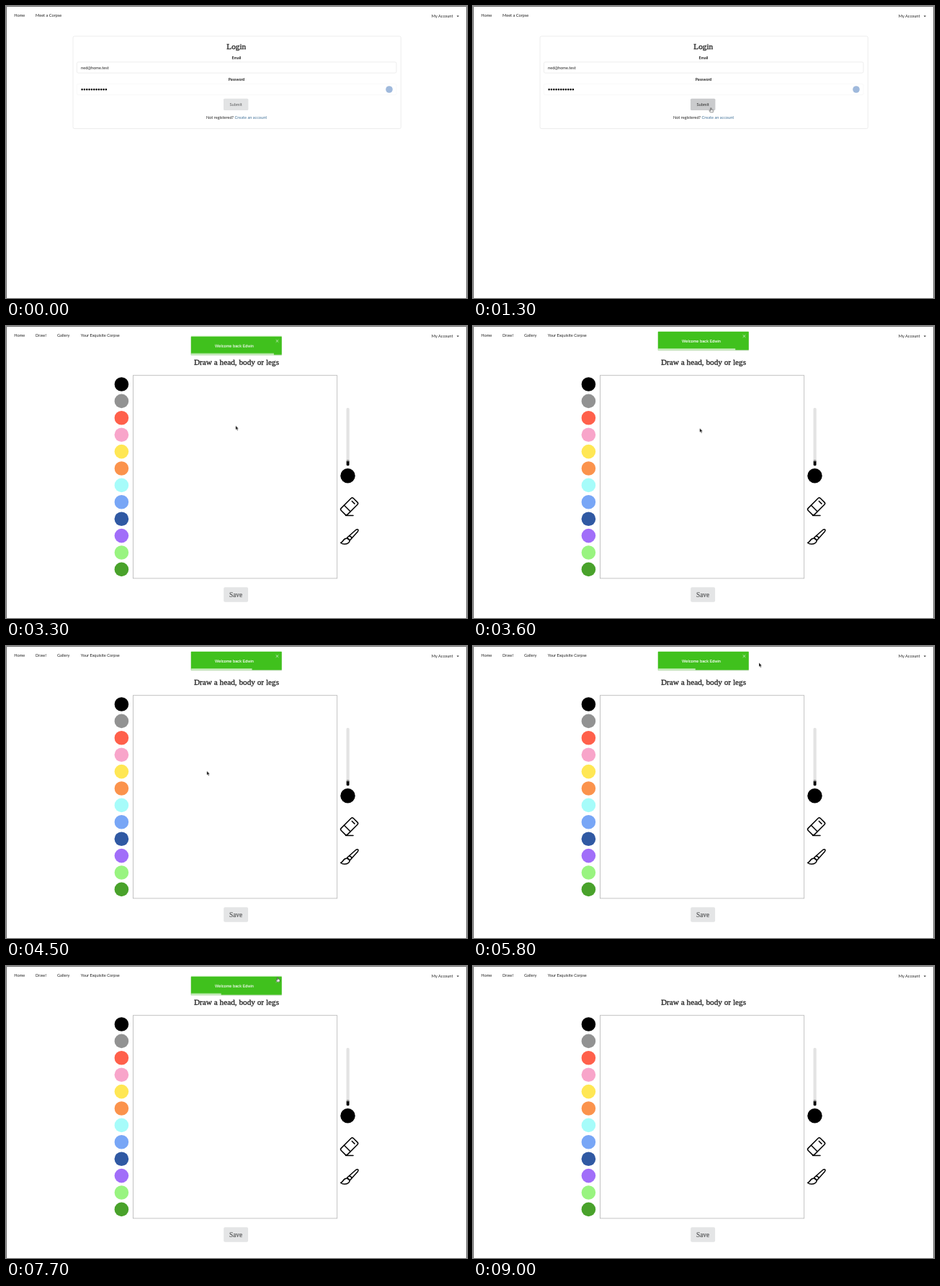
Animation, 640 px wide and 406 px high, one loop 9200 ms. Source, as an HTML page:

```html
<!DOCTYPE html>
<html lang="en">
<head>
<meta charset="utf-8">
<title>Drawing app login</title>
<style>
  html, body { margin: 0; width: 100%; height: 100%; overflow: hidden; background: #fff; }
  svg { display: block; width: 640px; height: 406px; }
  text { font: 5.65px Lato, sans-serif; fill: #222; }
  .mid { text-anchor: middle; }
  .label { font-size: 5.3px; font-weight: 700; }
  .title { font: 11.25px "Liberation Serif", serif; stroke: #222; stroke-width: .3; }
  .save { font: 9.3px "Liberation Serif", serif; fill: #58595a; stroke: #58595a; stroke-width: .2; }
  .toast-text { font: 5.65px "Liberation Sans", sans-serif; fill: #fff; stroke: #fff; stroke-width: .1; }
  .link { fill: #45749b; }
  .line { fill: none; stroke: #000; stroke-width: 1.5; stroke-linejoin: round; stroke-linecap: round; }
  .box { fill: #fff; stroke: #e6e6e6; stroke-width: .7; }
  #bar { transform-box: fill-box; transform-origin: left; }
</style>
</head>
<body>
<svg viewBox="0 0 640 406" xmlns="http://www.w3.org/2000/svg">
  <path d="M.5 406V.5H639.5V406" fill="none" stroke="#6a6a6a"/>
  <text x="11.3" y="15.3">Home</text>
  <text x="590.8" y="16.1">My Account</text>
  <path d="M625.7 13.4h3.2l-1.6 1.8z" fill="#222"/>

  <g id="login">
    <text x="41" y="15.3">Meet a Corpse</text>
    <rect class="box" x="93" y="42" width="455.3" height="128.5" rx="2"/>
    <text class="title mid" x="319.8" y="60">Login</text>
    <text class="label mid" x="320" y="73.9">Email</text>
    <rect class="box" x="98.4" y="77.9" width="443.6" height="15.2" rx="2"/>
    <text x="104" y="87.6">ned@home.test</text>
    <text class="label mid" x="320" y="104.1">Password</text>
    <rect class="box" x="98.4" y="108.3" width="443.6" height="15.2" rx="2" stroke-opacity=".4"/>
    <g id="dots"></g>
    <circle id="badge" cx="532" cy="116" r="4.8" fill="#9fb9dc"/>
    <rect id="submit" x="302" y="128.7" width="34.4" height="16.4" rx="1.6" fill="#e2e3e4"/>
    <text id="submitText" class="mid" x="319.2" y="139">Submit</text>
    <text x="278" y="157">Not registered? <tspan class="link">Create an account</tspan></text>
  </g>

  <g id="draw">
    <text x="41" y="15.3">Draw!</text>
    <text x="71" y="15.3">Gallery</text>
    <text x="103.8" y="15.3">Your Exquisite Corpse</text>
    <text class="title mid" x="320" y="53.8">Draw a head, body or legs</text>
    <rect x="176.5" y="68.7" width="283.2" height="282.2" fill="#fff" stroke="#b4b4b4" stroke-width=".8"/>
    <g id="palette"></g>
    <rect x="472.5" y="113.8" width="4.2" height="80.5" rx="2" fill="#e3e3e3"/>
    <rect x="472.7" y="187" width="3.8" height="7.2" rx="1.5"/>
    <rect x="472.7" y="186" width="3.8" height="2.2" rx="1" fill="#999"/>
    <circle cx="474.5" cy="208.3" r="10.2"/>
    <g class="line">
      <g transform="translate(476.6 250.8) rotate(-45)">
        <rect x="-12" y="-6.2" width="24" height="12.4" rx="2.2"/>
        <path d="M-4 -6.2V6.2M7.8 -2.6V2.6"/>
      </g>
      <path d="M471.5 263.4H482"/>
      <path d="M473.6 294.2L486 283.3q1.8-1.2 2.7-.2t-.3 2.6L477.4 298zM476.8 291.2L480.4 294.6"/>
      <path d="M473.2 295.2c-5-.2-4.4 4.4-8.5 6.3c3 2.3 8.4 2.2 10.8 0c1.7-1.6 1.8-2.9 1.5-4z"/>
    </g>
    <rect x="302.2" y="363.2" width="33.9" height="20.6" rx="1.8" fill="#e4e5e6"/>
    <text class="save mid" x="319.1" y="377.2">Save</text>
  </g>

  <g id="toast">
    <rect x="256.6" y="8.4" width="126.6" height="26.2" rx=".5" fill="#000" opacity=".1"/>
    <rect x="256.8" y="7.7" width="126" height="25.8" rx=".4" fill="#40c11d"/>
    <text class="toast-text mid" x="317" y="22.6">Welcome back Edwin</text>
    <path d="M374.7 12.3l3.6 3.6m0-3.6l-3.6 3.6" stroke="#fff" stroke-width=".7" opacity=".85"/>
    <rect id="bar" x="256.8" y="31.4" width="126" height="2.1" fill="#fff" opacity=".75"/>
  </g>

  <g id="cursor">
    <path id="arrow" d="M0 0V5.6L1.3 4.5 2.3 6.7 3.2 6.3 2.3 4.2H4z" stroke="#fff" stroke-width=".35"/>
    <path id="hand" d="M-.6 .6q.6-.8 1.2 0V2.9q1.4-.4 2.6 .6 .4 1.6-.5 3.2H-.6L-2.3 4.2q.2-.9 1.1-.3l.6 .5z"
      fill="#fff" stroke="#222" stroke-width=".6" stroke-linejoin="round"/>
  </g>
</svg>
<script>
const LOOP = 9200, STEP = 100;
const PAGE = 2870, BOUNCE = 700, HOVER = 6200, CLOSE = 7480;
const K = 0.42; // page scale
const tracks = [];
const el = id => document.getElementById(id);

// rows: [ms, properties, easing to the next row]
function track(id, rows) {
  const last = rows[rows.length - 1];
  const frames = [[0, rows[0][1], 'step-end'], ...rows, [LOOP, last[1]]]
    .map(([ms, props, easing = 'linear']) => ({ offset: ms / LOOP, easing, ...props }));
  const anim = el(id).animate(frames, { duration: LOOP, fill: 'both' });
  anim.pause();
  tracks.push(anim);
}

// rows: [ms, value], each value held until the next row
const hold = (id, prop, rows) =>
  track(id, rows.map(([ms, v]) => [ms, { [prop]: v }, 'step-end']));

const move = (x, y) => ({ transform: `translate(${x}px, ${y}px)` });
const drop = (y, opacity = 1) => ({ ...move(0, y * K), opacity });

function circles(id, count, make) {
  for (let i = 0; i < count; i++) {
    const c = document.createElementNS('http://www.w3.org/2000/svg', 'circle');
    for (const [k, v] of Object.entries(make(i))) c.setAttribute(k, v);
    el(id).append(c);
  }
}

const colours = ['#000', '#929292', '#ff604b', '#f8a5ca', '#ffe754', '#fb934c',
  '#a6fcfa', '#78a6f6', '#3059a3', '#a16ef9', '#99f480', '#49a22b'];
circles('palette', colours.length, i => ({ cx: 160.4, cy: 81 + 23.4 * i, r: 9.8, fill: colours[i] }));
circles('dots', 11, i => ({ cx: 105.6 + 3.33 * i, cy: 116.1, r: 1.3, fill: '#111' }));

hold('login', 'opacity', [[0, 1], [PAGE, 0]]);
hold('draw', 'opacity', [[0, 0], [PAGE, 1]]);
hold('badge', 'opacity', [[0, 1], [2300, 0]]);
hold('submit', 'fill', [[0, '#e2e3e4'], [1200, '#cacbcd'], [2300, '#babbbc'], [2400, '#cfd0d1']]);
hold('submitText', 'fill', [[0, '#5c5d5e'], [1200, '#2b2b2b']]);

const spring = 'cubic-bezier(.215, .61, .355, 1)';
const enter = f => PAGE + BOUNCE * f;
const leave = f => CLOSE + BOUNCE * f;
track('toast', [
  [PAGE, drop(-3000, 0), spring],
  [enter(.6), drop(25), spring],
  [enter(.75), drop(-10), spring],
  [enter(.9), drop(5), spring],
  [enter(1), drop(0)],
  [leave(0), drop(0), 'ease'],
  [leave(.2), drop(-10), 'ease'],
  [leave(.4), drop(20)],
  [leave(.45), drop(20), 'ease'],
  [leave(1), drop(-2000, 0)]
]);

// the countdown pauses while the pointer is on the toast
track('bar', [
  [PAGE, { transform: 'scaleX(1)' }],
  [HOVER, { transform: `scaleX(${1 - (HOVER - PAGE) / 5000})` }]
]);

const path = [
  [100, 425, 362], [600, 388, 235], [1000, 349, 142], [1500, 321, 141],
  [1700, 321, 141], [2000, 319, 139.5], [2300, 318.8, 138.6], [3400, 318.8, 138.6],
  [4300, 278.8, 173.8], [4800, 278.8, 173.8], [5600, 394, 26], [5800, 397, 23.2],
  [6000, 401, 22], [6300, 379, 18], [6900, 377, 15.5], [7800, 377, 15.5], [8600, 553, 388]
];
track('cursor', path.map(([ms, x, y]) => [ms, move(x, y), 'ease-in-out']));
hold('arrow', 'opacity', [[0, 0], [100, 1], [1200, 0], [PAGE, 1], [HOVER, 0], [7900, 1], [8700, 0]]);
hold('hand', 'opacity', [[0, 0], [1200, 1], [PAGE, 0], [HOVER, 1], [7900, 0]]);

const start = performance.now();
function render() {
  const t = Math.max(0, performance.now() - start) % LOOP;
  const shown = Math.floor(t / STEP) * STEP;
  for (const anim of tracks) anim.currentTime = shown;
  requestAnimationFrame(render);
}
render();
</script>
</body>
</html>
```
